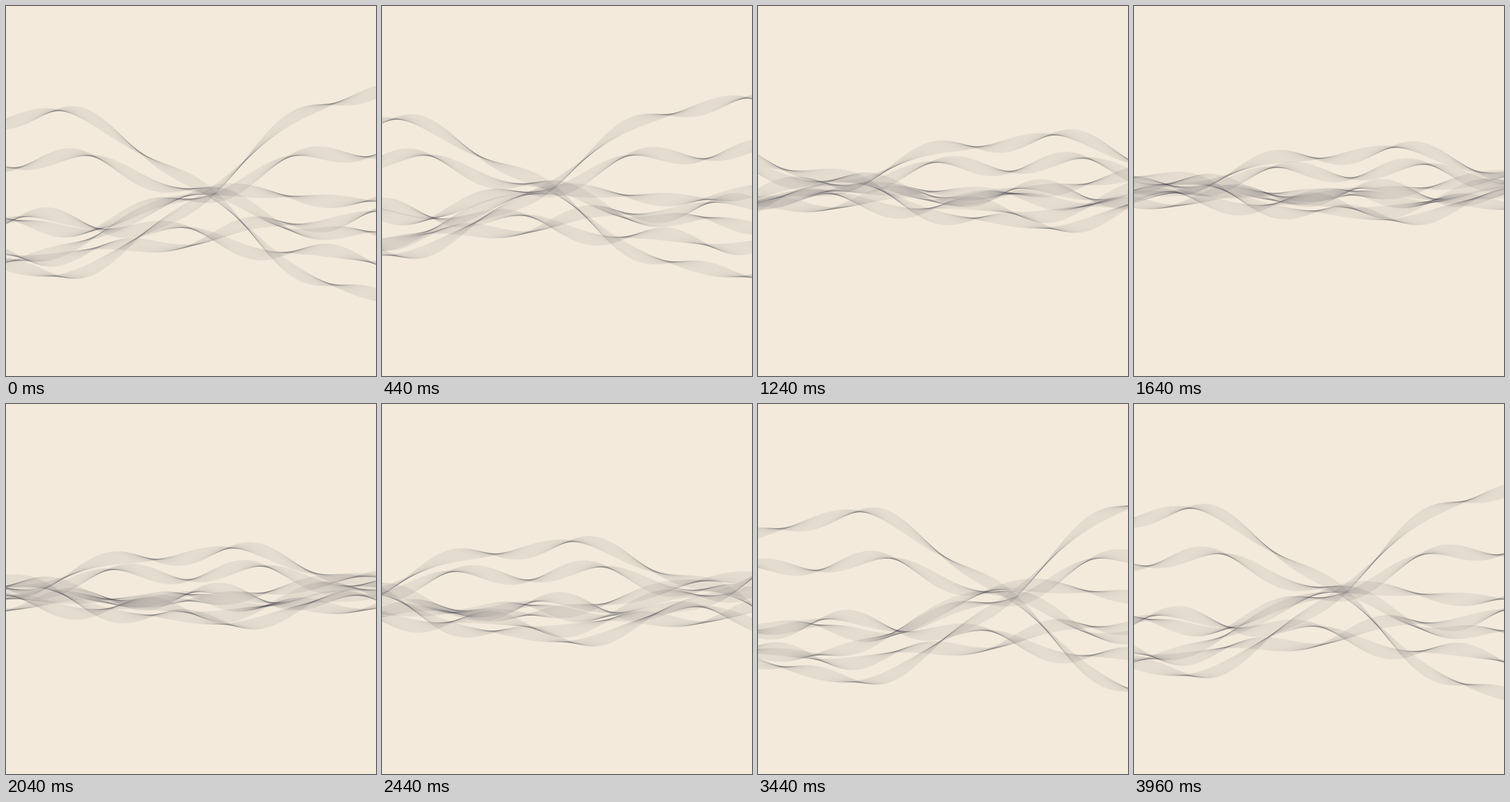
Write an HTML page with a canvas that moves like this. It is 500 px wide and 500 px high and loops after 4000 ms.

```html
<!DOCTYPE html>
<html lang="en">
<head>
<meta charset="utf-8">
<title>Drifting ribbons</title>
<style>
  html, body { margin: 0; width: 100%; height: 100%; overflow: hidden; background: #f3eadb; }
  canvas { display: block; width: 500px; height: 500px; }
</style>
</head>
<body>
<canvas id="stage" width="500" height="500"></canvas>
<script>
const LOOP = 4000, FRAME = 40, SIZE = 500, STEP = 4;
const WAVELENGTH = 950, CREST = 30;
const STRANDS = 24, SWING = 19, SPREAD = 0.95;
const TAU = 2 * Math.PI, RAD = Math.PI / 180;
const ctx = document.getElementById('stage').getContext('2d');

// reach, offset and tilt scale with the swell; phases are in degrees.
// A mirrored ribbon runs half a wave behind, and the two swap places every loop.
const kinds = [
  { reach: 1, offset: 0, tilt: 0, ripple: 8, ripplePhase: 57, twist: 22, mirrored: true },
  { reach: 0.43, offset: 0, tilt: 0, ripple: 10, ripplePhase: 38, twist: -62, mirrored: true },
  { reach: 0.21, offset: 0.45, tilt: 0, ripple: 9, ripplePhase: 142, twist: 113, mirrored: true },
  { reach: 0, offset: 0.2, tilt: 0.32, sway: 0.19, ripple: 0, ripplePhase: 0, twist: 120 }
];
const ribbons = kinds.flatMap(kind => kind.mirrored
  ? [{ ...kind, lag: 0 }, { ...kind, lag: Math.PI }]
  : [{ ...kind, lag: 0 }]);

const pulse = (time, peak) => Math.cos(TAU * (time - peak) / LOOP);

function profile(ribbon, x, time) {
  const swell = 90 + 45 * pulse(time, 3750);
  const middle = 250 + 12 * pulse(time, 3200);
  const across = x / SIZE;
  const angle = TAU * ((x - CREST) / WAVELENGTH + time / (2 * LOOP)) + ribbon.lag;
  const wave = -ribbon.reach * (0.8 + 0.28 * across) * Math.cos(angle)
    + (ribbon.sway || 0) * Math.cos(2 * angle)
    + ribbon.tilt * (1 - 2 * across) + ribbon.offset;
  const ripple = ribbon.ripple * Math.cos(5 * angle + ribbon.ripplePhase * RAD);
  return {
    x,
    y: middle + swell * wave + ripple,
    twist: 4 * angle + ribbon.twist * RAD + 0.35 * Math.sin(2 * angle)
  };
}

function drawRibbon(ribbon, time) {
  const spine = [];
  for (let x = -STEP; x <= SIZE + STEP; x += STEP) spine.push(profile(ribbon, x, time));
  for (let s = 0; s < STRANDS; s++) {
    const turn = (s / (STRANDS - 1) - 0.5) * SPREAD;
    ctx.beginPath();
    for (const { x, y, twist } of spine) {
      ctx.lineTo(x, y + SWING * (Math.sin(twist + turn) - Math.sin(twist)));
    }
    ctx.stroke();
  }
}

function draw(time) {
  ctx.fillStyle = '#f3eadb';
  ctx.fillRect(0, 0, SIZE, SIZE);
  ctx.strokeStyle = 'rgba(50, 50, 60, 0.085)';
  ctx.lineWidth = 0.65;
  for (const ribbon of ribbons) drawRibbon(ribbon, time);
}

const start = performance.now();
function tick() {
  const elapsed = Math.max(0, performance.now() - start) % LOOP;
  draw(Math.floor(elapsed / FRAME) * FRAME);
  requestAnimationFrame(tick);
}
tick();
</script>
</body>
</html>
```
